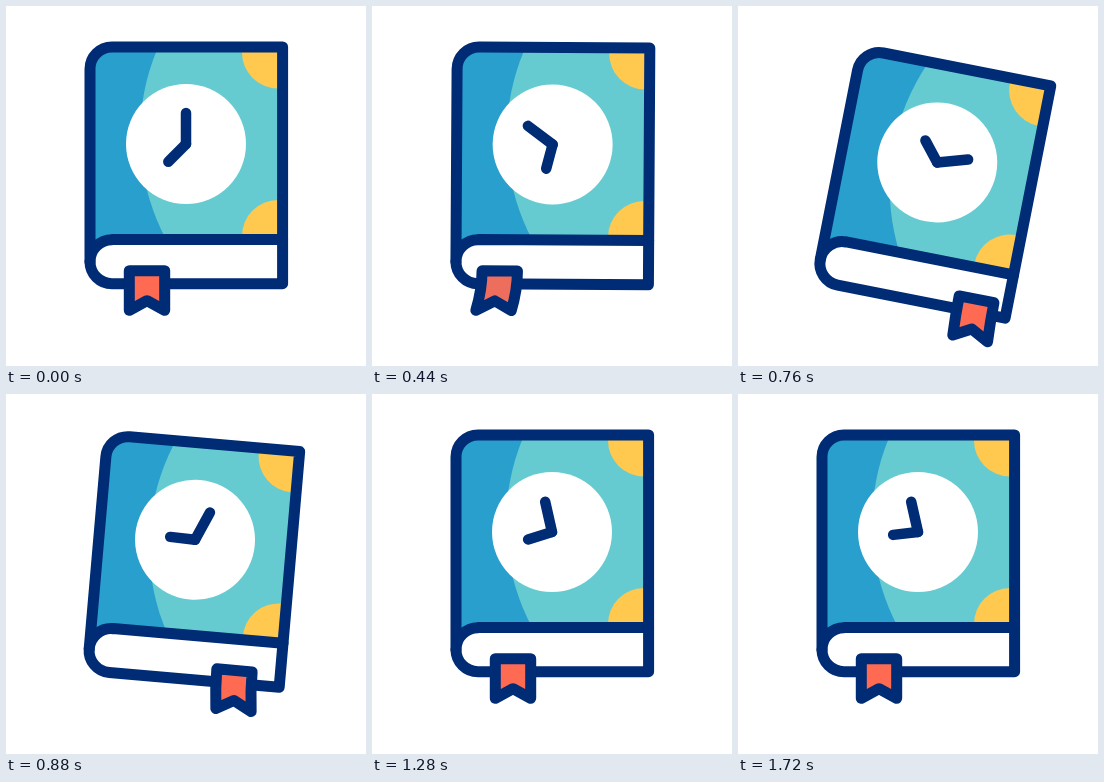
These frames come from a looping animation (360x360 px, 2200 ms). An HTML page with a canvas:

```html
<!DOCTYPE html>
<html lang="en">
<head>
<meta charset="utf-8">
<title>Book with clock</title>
<style>
html, body { margin: 0; width: 100%; height: 100%; overflow: hidden; background: #fff; }
canvas { display: block; width: 100vmin; height: 100vmin; }
</style>
</head>
<body>
<canvas id="stage"></canvas>
<script>
const SIZE = 360, LOOP = 2200, STEP = 40, REST = 1720;
const NAVY = '#002b75', TEAL = '#66cbd0', BLUE = '#289fcd', YELLOW = '#ffc84f';
const PIVOT = { x: 95, y: 246 }, CLOCK = { x: 180, y: 138 };

const canvas = document.getElementById('stage');
const ctx = canvas.getContext('2d');

const rad = deg => deg * Math.PI / 180;
const ramp = (t, from, to) => Math.min(1, Math.max(0, (t - from) / (to - from)));

function ease(t, from, to) {
  const u = ramp(t, from, to);
  return u * u * (3 - 2 * u);
}

// The book leans left, then right, then stands up again.
const tilt = t =>
  -10.6 * ease(t, 0, 275) + 25 * ease(t, 275, 635) - 14.4 * ease(t, 635, 1040);

// Both hands swing after the book; angles run clockwise from the top.
const swing = (t, rest, left, right, back, settle, end) =>
  rest - left * ease(t, 0, 300) + right * ease(t, 390, 720)
  - back * ease(t, 720, 1080) + settle * ease(t, 1080, end);
const minuteHand = t => swing(t, 0, 62, 140, 130, 39.3, 1280);
const hourHand = t => swing(t, 225, 39, 139, 128, 66.4, 1348);

// The ribbon slides along the spine and trails behind its own speed.
const ribbonX = t =>
  141 - 19 * ease(t, 0, 215) + 126 * ease(t, 410, 640) - 107 * ramp(t, 700, 1260) ** 1.6;
const ribbonSway = t => -8 * (ribbonX(t + 1) - ribbonX(t - 1));
const ribbonTint = t => ease(t, 0, 200) - ease(t, 200, 600);

function disc(x, y, r, color) {
  ctx.fillStyle = color;
  ctx.beginPath();
  ctx.arc(x, y, r, 0, 2 * Math.PI);
  ctx.fill();
}

function coverPath() {
  ctx.beginPath();
  ctx.moveTo(276.6, 41);
  ctx.lineTo(276.6, 233.5);
  ctx.lineTo(106, 233.5);
  ctx.arc(106, 255.7, 22, -Math.PI / 2, Math.PI, true);
  ctx.lineTo(84, 63);
  ctx.arc(106, 63, 22, Math.PI, 1.5 * Math.PI);
  ctx.closePath();
}

function drawCover() {
  ctx.save();
  coverPath();
  ctx.clip();
  ctx.fillStyle = BLUE;
  ctx.fillRect(80, 36, 200, 225);
  disc(356, 129, 222, TEAL);
  disc(272, 46.5, 36, YELLOW);
  disc(272, 230, 36, YELLOW);
  ctx.restore();
  disc(CLOCK.x, CLOCK.y, 60, '#fff');
}

function drawOutline() {
  coverPath();
  ctx.stroke();
  ctx.beginPath();
  ctx.moveTo(276.6, 233.5);
  ctx.lineTo(276.6, 277.7);
  ctx.lineTo(106, 277.7);
  ctx.arc(106, 255.7, 22, Math.PI / 2, Math.PI);
  ctx.stroke();
}

function drawHand(angle, length) {
  ctx.beginPath();
  ctx.moveTo(CLOCK.x, CLOCK.y);
  ctx.lineTo(CLOCK.x + length * Math.sin(rad(angle)), CLOCK.y - length * Math.cos(rad(angle)));
  ctx.stroke();
}

function drawRibbon(x, sway, tint) {
  const half = 17.7, top = 264.7, mid = 284, tip = 304.3, notch = 294.7;
  const mix = (a, b) => Math.round(a + (b - a) * tint);
  ctx.beginPath();
  ctx.moveTo(x - half, top);
  ctx.lineTo(x + half, top);
  ctx.quadraticCurveTo(x + half, mid, x + half + sway, tip);
  ctx.lineTo(x + sway * 0.8, notch);
  ctx.lineTo(x - half + sway, tip);
  ctx.quadraticCurveTo(x - half, mid, x - half, top);
  ctx.closePath();
  ctx.fillStyle = `rgb(${mix(255, 204)}, ${mix(106, 118)}, ${mix(82, 112)})`;
  ctx.fill();
  ctx.stroke();
}

function draw(t) {
  const scale = canvas.width / SIZE;
  ctx.setTransform(scale, 0, 0, scale, 0, 0);
  ctx.fillStyle = '#fff';
  ctx.fillRect(0, 0, SIZE, SIZE);

  ctx.translate(PIVOT.x, PIVOT.y);
  ctx.rotate(rad(tilt(t)));
  ctx.translate(-PIVOT.x, -PIVOT.y);

  ctx.strokeStyle = NAVY;
  ctx.lineWidth = 11;
  ctx.lineCap = ctx.lineJoin = 'round';
  drawCover();
  drawOutline();
  drawRibbon(ribbonX(t), ribbonSway(t), ribbonTint(t));
  ctx.lineWidth = 10.5;
  drawHand(minuteHand(t), 31);
  drawHand(hourHand(t), 25);
}

function resize() {
  const side = Math.min(innerWidth, innerHeight) || SIZE;
  canvas.width = canvas.height = Math.round(side * (devicePixelRatio || 1));
}

const start = performance.now();

function tick() {
  const t = (performance.now() - start) % LOOP;
  draw(Math.min(Math.floor(t / STEP) * STEP, REST));
  requestAnimationFrame(tick);
}

addEventListener('resize', resize);
resize();
tick();
</script>
</body>
</html>
```
